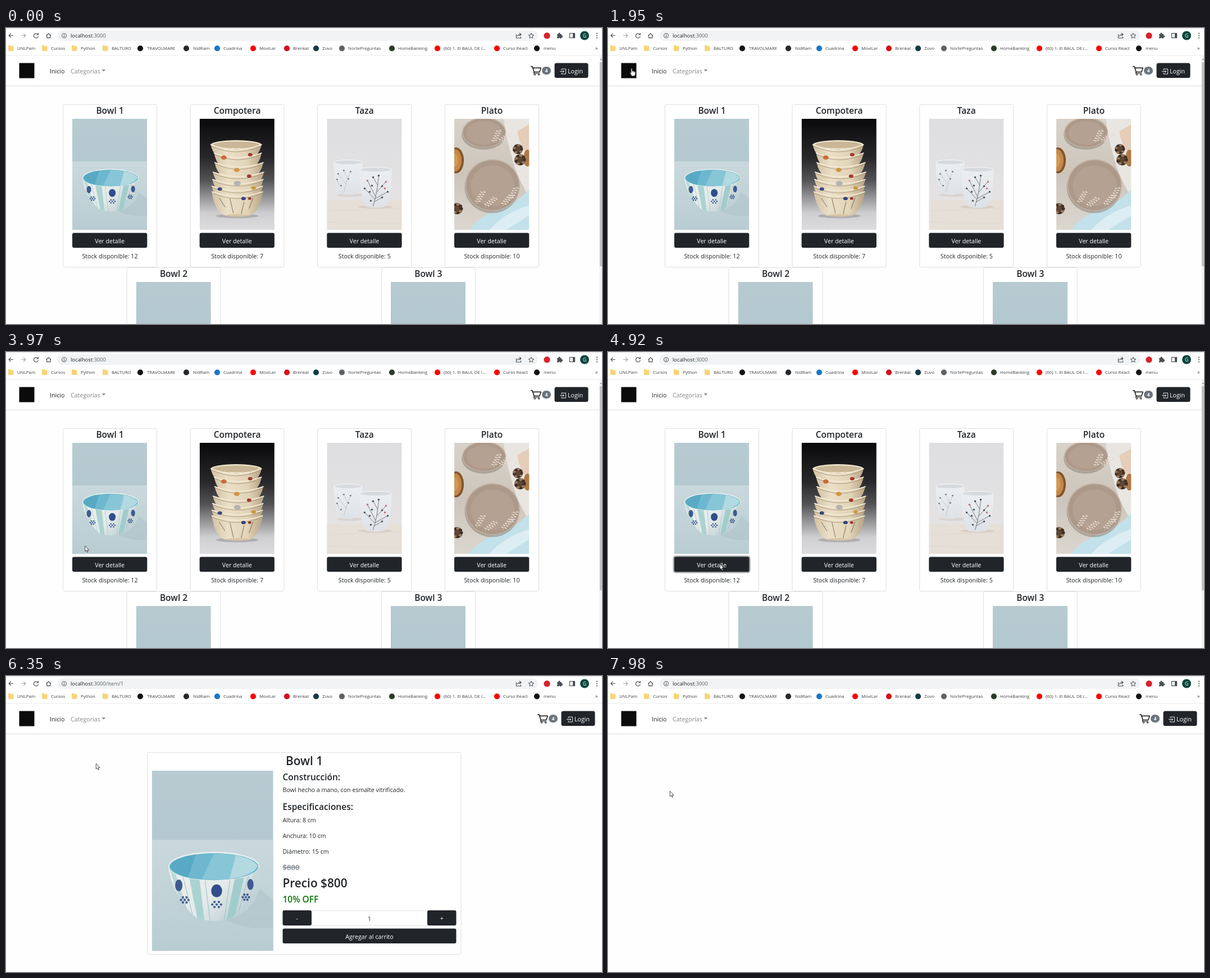
An HTML page for the animation above (8000 ms loop, 1061 by 528 pixels).

```html
<!DOCTYPE html>
<html lang="es">
<head>
<meta charset="utf-8">
<title>Tienda</title>
<style>
html, body { margin: 0; width: 100%; height: 100%; background: #fefefe; }
svg#stage { position: fixed; left: 0; top: 0; width: 1061px; height: 528px; font: 10.66px "Open Sans", "Noto Sans", sans-serif; fill: #212529; }
.mark { font-size: 7.9px; fill: #3c4043; }
.url { font-size: 9.3px; fill: #202124; }
.h5 { font-size: 15.5px; font-weight: 600; }
.h3 { font-size: 20.8px; font-weight: 600; }
.mid { text-anchor: middle; }
.white { fill: #fff; }
.line { fill: none; stroke: #4b4f54; stroke-width: 1.2; }
</style>
</head>
<body>
<svg id="stage" viewBox="0 0 1061 528" xmlns="http://www.w3.org/2000/svg"></svg>
<script>
const stage = document.getElementById('stage');
const DARK = '#212529';

const rect = (x, y, w, h, fill, more = '') => `<rect x="${x}" y="${y}" width="${w}" height="${h}" fill="${fill}" ${more}/>`;
const dot = (x, y, r, fill, more = '') => `<circle cx="${x}" cy="${y}" r="${r}" fill="${fill}" ${more}/>`;
const oval = (x, y, rx, ry, fill, more = '') => `<ellipse cx="${x}" cy="${y}" rx="${rx}" ry="${ry}" fill="${fill}" ${more}/>`;
const text = (x, y, s, cls = '', more = '') => `<text x="${x}" y="${y}" class="${cls}" ${more}>${s}</text>`;
const path = (d, fill, more = '') => `<path d="${d}" fill="${fill}" ${more}/>`;
const stroke = (d, color, w) => path(d, 'none', `stroke="${color}" stroke-width="${w}" stroke-linecap="round"`);
const range = (n, fn) => Array.from({ length: n }, (_, i) => fn(i)).join('');
const grad = (id, stops, dir = 'x2="0" y2="1"') => `<linearGradient id="${id}" ${dir}>` +
  stops.map(([o, c]) => `<stop offset="${o}" stop-color="${c}"/>`).join('') + '</linearGradient>';
const photo = (id, body) => `<symbol id="${id}" viewBox="0 0 133 198">${body}</symbol>`;
const frame = (x, y, w, h) => rect(x + .5, y + .5, w - 1, h - 1, '#fff', 'rx="2.5" stroke="#dfdfdf"');
const button = (x, y, w, h, label) => rect(x, y, w, h, DARK, 'rx="3"') + text(x + w / 2, y + h / 2 + 4.8, label, 'mid white');

function bowlPhoto() {
  const body = 'M18 105C19 118 28 139 37 149Q46 161 52 163Q68 167 84 163Q91 161 100 149C110 136 117 118 118 105Z';
  const flower = (x, y, w) => dot(x, y, 1.3, '#3f5a90') +
    range(6, i => dot(x + w * Math.cos(i * Math.PI / 3), y + 3.2 * Math.sin(i * Math.PI / 3), 1.3, '#3f5a90'));
  return rect(0, 0, 133, 198, 'url(#wall)') + rect(0, 76, 133, 122, 'url(#table)') +
    path('M80 164Q110 158 118 130L133 142V172Q105 176 80 164Z', '#abc1c7', 'opacity=".5"') +
    `<clipPath id="bowlClip"><path d="${body}"/></clipPath>` + path(body, 'url(#glaze)') +
    '<g clip-path="url(#bowlClip)">' +
    path('M41 118H52L58 168H51Z', '#a9d3d1') + path('M91 118H101L89 168H81Z', '#a0cdcb') +
    path('M18 104H23L42 162H37Z', '#bcdad9') + path('M113 105H120V130L104 150Z', '#c5d5d8') +
    stroke('M58 118L64 166M86 118L79 166M34 116L46 164M106 115L93 163', '#8fc0ca', .6) + '</g>' +
    oval(68, 105, 50, 16, '#e6eeed') + oval(68, 105.5, 48.8, 14.8, '#6db8cf') +
    path('M68 91Q80 90 92 93L85 119Q70 121 55 119Z', '#86c6d7') + path('M92 93Q112 97 116 105Q113 112 97 117L85 119Z', '#b3d9e1') +
    path('M20 105Q22 96 48 92L40 117Q23 114 20 105Z', '#58aac4') +
    oval(29.5, 126, 4, 6.5, '#3f5a90') + oval(71, 132, 6, 7, '#304d8d') + oval(108, 125, 3.5, 6, '#3f5a90') +
    flower(36, 142, 4) + flower(71, 147, 4.8) + flower(103, 139, 3.4);
}

function stackPhoto() {
  const rims = [[65, 46, 45], [68, 61, 42], [70, 78, 43], [69, 95, 45], [68, 108, 45], [67, 120, 45], [67, 130, 45]];
  const bowls = rims.map(([x, y, r], i) => {
    const h = i < 6 ? 28 : 42, sag = i ? 8 : 9;
    return path(`M${x - r} ${y}C${x - r + 2} ${y + h * .5} ${x - 32} ${y + h - 2} ${x - 22} ${y + h}Q${x} ${y + h + 3} ${x + 22} ${y + h}C${x + 32} ${y + h - 2} ${x + r - 2} ${y + h * .5} ${x + r} ${y}Q${x} ${y + sag * 2} ${x - r} ${y}Z`, 'url(#clay)') +
      stroke(`M${x - r} ${y}Q${x} ${y + sag * 2} ${x + r} ${y}`, '#f3ead6', 1.8) +
      stroke(`M${x - r + 2} ${y + 3}Q${x} ${y + sag * 2 + 5} ${x + r - 2} ${y + 3}`, '#9b8567', .7);
  }).join('');
  const spots = [[43, 69, 5, '#cf6a35'], [90, 64, 4, '#a5382c'], [66, 91, 5, '#cf9743'], [88, 102, 4, '#a5382c'], [67, 115, 6, '#b5b3b0'],
    [36, 125, 4, '#3a4681'], [96, 123, 4, '#c99a3a'], [78, 142, 4, '#34427f'], [89, 142, 3, '#98332d']];
  return rect(0, 0, 133, 198, 'url(#studio)') + oval(67, 173, 38, 4, '#8d8b8b', 'opacity=".5"') +
    oval(65, 46, 45, 8, '#efe4cc') + oval(65, 46.5, 42, 6, '#c9b696') + bowls +
    spots.map(([x, y, r, c]) => oval(x, y, r, r * .75, c)).join('') +
    stroke('M54 142L60 168M79 148L74 169M35 141L45 157M95 141L88 160', '#4c4037', .7) +
    oval(67, 172, 20, 2.2, '#d6c4a5');
}

function cupsPhoto() {
  const cup = (x, y, w, h) => path(`M${x} ${y}C${x} ${y + h * .6} ${x + 6} ${y + h} ${x + 15} ${y + h}Q${x + w / 2} ${y + h + 3} ${x + w - 15} ${y + h}C${x + w - 6} ${y + h} ${x + w} ${y + h * .6} ${x + w} ${y}Z`, 'url(#cup)') +
    oval(x + w / 2, y, w / 2, 4.5, '#eff1f3') + oval(x + w / 2, y + .5, w / 2 - 1.5, 3.4, '#d6d9de');
  const berries = (pts, color, r) => pts.map(([x, y, red]) => dot(x, y, r, red ? '#bf6a62' : color)).join('');
  return rect(0, 0, 133, 198, 'url(#pale)') + rect(0, 145, 133, 53, '#e6dfd7') + stroke('M0 164L133 159M0 184L133 187', '#ddd3c8', .6) +
    oval(42, 136, 25, 3, '#cfc8c3', 'opacity=".5"') + cup(12, 77, 51, 57) +
    stroke('M30 130Q34 112 42 94M34 116L20 98M37 108L30 92M22 118L18 108', '#a3a6ab', .5) +
    berries([[20, 98], [30, 92], [42, 94], [18, 108], [25, 119], [38, 107]], '#75787e', 1.4) +
    oval(86, 157, 30, 3, '#cfc4b9', 'opacity=".6"') + cup(58, 90, 57, 67) +
    stroke('M82 155Q90 130 92 102M85 143L67 124M86 138L72 110M89 130L105 112M86 142L108 130M90 118L82 104M84 148L98 140', '#4a4d52', .7) +
    berries([[67, 124, 0], [72, 110, 1], [82, 104, 0], [92, 101, 0], [105, 112, 1], [108, 130, 0], [98, 140, 0], [76, 130, 0], [98, 120, 0], [103, 124, 1], [78, 146, 0], [80, 119, 0]], '#484b50', 1.6);
}

function platesPhoto() {
  const sprig = (x, y, turn) => `<g transform="translate(${x} ${y}) rotate(${turn})">` + stroke('M0 0Q3 -14 9 -25', '#e6dcd1', .6) +
    range(5, i => oval(i * 1.6 - 2, -4 - i * 4.4, 2.1, 1, '#e6dcd1') + oval(i * 1.6 + 4, -5 - i * 4.4, 2.1, 1, '#e6dcd1')) + '</g>';
  const cone = (x, y, r) => dot(x, y, r, '#5d4635') + range(9, i => oval(x + r * .75 * Math.cos(i * .7), y + r * .75 * Math.sin(i * .7), r * .3, r * .2, i % 2 ? '#9b7b5c' : '#3c2d24'));
  const plate = (x, y, rx, ry) => oval(x - 1, y + 4, rx, ry, '#7d7166', 'opacity=".45"') + oval(x, y, rx, ry, '#c3b3a5') +
    oval(x, y + .5, rx - 1.5, ry - 1.5, '#ac9989') + oval(x, y + 1, rx * .8, ry * .78, '#b4a191');
  return rect(0, 0, 133, 198, 'url(#linen)') + path('M88 0H133V140L112 100Q92 40 88 0Z', '#e9e6e2') + path('M112 22L133 10V66Q116 50 112 22Z', '#e6cdb9') +
    path('M26 198Q44 172 84 160Q114 146 133 126V198Z', '#c2e1ea') + path('M62 198Q88 168 133 154V172L92 198Z', '#dceef3') +
    oval(3, 74, 14, 23, '#80552f') + oval(1, 74, 12, 20, '#c48746') + oval(0, 74, 7, 12, '#d39a58') +
    oval(130, 70, 7, 15, '#b07a45') + plate(53, 24, 39, 27) + plate(68, 118, 48.5, 46) +
    sprig(70, 43, 5) + sprig(80, 41, 35) + sprig(40, 151, 10) + sprig(55, 157, 30) + sprig(86, 155, 20) + sprig(100, 145, 5) +
    cone(113, 54, 9) + cone(117, 73, 10) + cone(5, 160, 10);
}

const defs = '<defs>' +
  grad('wall', [[0, '#b7cbd1'], [1, '#aec5cc']]) + grad('table', [[0, '#c9d8dc'], [.6, '#c0d2d7'], [1, '#b8ccd2']]) +
  grad('glaze', [[0, '#eef0ee'], [.6, '#e4eae9'], [1, '#bccdd1']], 'x2="1" y2=".6"') +
  grad('studio', [[0, '#09090b'], [.35, '#28282b'], [.55, '#525255'], [.7, '#929294'], [.85, '#cfcfd1'], [1, '#dcdcde']]) +
  grad('clay', [[0, '#d3c2a4'], [.3, '#eadfc7'], [.7, '#e2d4b8'], [1, '#b7a384']], 'x2="1" y2="0"') +
  grad('pale', [[0, '#dedee1'], [1, '#e7e4e3']]) + grad('cup', [[0, '#eceef1'], [1, '#dee2e7']]) +
  grad('linen', [[0, '#d8d2ca'], [.5, '#cdc5ba'], [1, '#dbd6cf']]) +
  photo('bowl', bowlPhoto()) + photo('stack', stackPhoto()) + photo('cups', cupsPhoto()) + photo('plates', platesPhoto()) + '</defs>';

function browser() {
  const marks = [['UNLPam', 20, 9], ['Cursos', 80, 69], ['Python', 133, 122], ['BALTURO', 188, 177],
    ['TRAVOLMARE', 251, 239, '#111'], ['NidRam', 333, 321, '#24292e'], ['Cuadrina', 387, 376, '#1778c8'], ['MoviLar', 451, 440, '#f00'],
    ['Brenkal', 511, 500, '#d3111b'], ['Zuvo', 563, 552, '#123c48'], ['NortePreguntas', 609, 598, '#5f6368'], ['HomeBanking', 698, 687, '#2d3a2c'],
    ['(60) 1. El BAUL DE I...', 779, 768, '#f00'], ['Curso React', 885, 874, '#f00'], ['menu', 957, 945, '#111']];
  const line = d => path(d, 'none', 'class="line"');
  return rect(0, 0, 1061, 49, '#fff') + rect(0, 0, 1061, 1, '#dee1e6') +
    line('M13 13.5H5.2M8.8 9.8L5.1 13.5L8.8 17.2') +
    `<g opacity=".5">${line('M27 13.5H34.8M31.2 9.8L34.9 13.5L31.2 17.2')}</g>` +
    line('M56.5 11.2A4 4 0 1 0 57.4 14.5M57.5 9V12H54.4') + line('M71.5 13.8L75.8 9.8L80 13.8M72.8 13V17.6H78.8V13') +
    rect(91, 4, 856, 19, '#f1f3f4', 'rx="9.5"') +
    dot(103.5, 13.7, 4, 'none', 'class="line" style="stroke-width:1"') + line('M103.5 13V16M103.5 11V12') +
    '<text x="115" y="17" class="url">localhost<tspan id="tail" fill="#5f6368">:3000</tspan></text>' +
    line('M909.5 12H908.5V18H916.5V15.5M910.5 15Q911 11.6 916.8 11.6M914 9L917 11.6L914 14.2') +
    path('M935 9L936.4 12.3L939.8 12.6L937.2 14.8L938 18.2L935 16.4L932 18.2L932.8 14.8L930.2 12.6L933.6 12.3Z', 'none', 'stroke="#4b4f54"') +
    dot(963, 13.7, 5.6, '#d8232a') +
    path('M981 11H983.3A1.8 1.8 0 1 1 986.7 11H989V13.4A1.7 1.7 0 1 1 989 16.6V18.5H986.5A1.7 1.7 0 0 0 983.5 18.5H981V16A1.7 1.7 0 0 0 981 13Z', '#4b4f54') +
    rect(1003.5, 9.5, 9, 8, 'none', 'class="line"') + rect(1009, 9, 4, 9, '#4b4f54') +
    dot(1030, 13.5, 8, '#0b473d') + text(1030, 16.6, 'G', 'mid white', 'font-size="8.5"') +
    [9.5, 13.5, 17.5].map(y => dot(1052, y, 1.1, '#4b4f54')).join('') +
    marks.map(([s, x, ix, c]) => (c ? dot(ix, 36.3, 5.1, c) : path(`M${ix - 5} 31h4l1 1.3h4.5v8.7h-9.5z`, '#f8d477')) + text(x, 39, s, 'mark')).join('') +
    text(1049, 39, '»', 'mark', 'style="font-size:9px"') + rect(0, 48.5, 1061, 1, '#e3e5e8');
}

const navbar = () => rect(0, 102, 1061, 3, '#000', 'opacity=".035"') + rect(0, 49.5, 1061, 53, '#fff') + rect(0, 102, 1061, 1, '#e9e9ea') +
  rect(23.5, 62.5, 27, 27, '#0b0b0b') + text(78, 80.6, 'Inicio') +
  '<g id="cat">' + text(115, 80.6, 'Categorías') + '<path d="M170.5 74H177.3L173.9 77.6Z"/></g>' +
  '<g id="right">' + path('M934 68.7H937L940.2 78.5H949.8L952.2 71.2H938.2', 'none', 'stroke="#111" stroke-width="1.5" stroke-linejoin="round"') +
  path('M940.2 78.5L939.5 81H950', 'none', 'stroke="#111" stroke-width="1.2"') +
  dot(941.5, 83, 1.3, '#fff', 'stroke="#111"') + dot(948.7, 83, 1.3, '#fff', 'stroke="#111"') +
  rect(954, 69, 16, 14, '#6c757d', 'rx="7"') + text(962, 79, '4', 'mid white', 'font-size="8.2" font-weight="700"') +
  rect(976.5, 62.5, 60, 26.5, DARK, 'rx="3.5"') +
  path('M989 75.5V73H996.5V82H989V79.5M986 77.5H993.5M991.5 75.5L993.6 77.5L991.5 79.5', 'none', 'stroke="#fff" stroke-width=".9"') +
  text(1000, 80.6, 'Login', 'white') + '</g>';

const detailButton = (x, y) => button(x, y, 133.3, 26.4, 'Ver detalle');

function card(x, y, title, stock, image) {
  return frame(x, y, 168, 291) + text(x + 84, y + 17, title, 'h5 mid') +
    `<use href="#${image}" x="${x + 17}" y="${y + 26}" width="133.3" height="198.3"/>` +
    detailButton(x + 17, y + 229.6) + text(x + 84, y + 274.5, 'Stock disponible: ' + stock, 'mid');
}

const home = () => '<g id="home">' +
  card(101, 136, 'Bowl 1', 12, 'bowl') + card(327.6, 136, 'Compotera', 7, 'stack') +
  card(554.3, 136, 'Taza', 5, 'cups') + card(781, 136, 'Plato', 10, 'plates') +
  card(214.5, 427, 'Bowl 2', 8, 'bowl') + card(667.8, 427, 'Bowl 3', 8, 'bowl') +
  '<g id="focus">' + rect(116.8, 364.4, 135.6, 28.8, 'none', 'rx="4" stroke="#a0a2a4" stroke-width="2.3"') + detailButton(118, 365.6) + '</g>' +
  rect(1056.5, 49.5, 5, 479, '#f1f1f1') + rect(1057, 61, 4, 364, '#c1c1c1') + path('M1057.5 57L1059.2 54.5L1061 57Z', '#8a8a8a') + '</g>';

const detail = () => '<g id="detail">' + frame(251, 136, 559.5, 361) + text(531, 158.5, 'Bowl 1', 'h3 mid') +
  '<use href="#bowl" x="259.7" y="168.8" width="216" height="321.6"/>' +
  text(492.5, 185.7, 'Construcción:', 'h5') + text(492.5, 207.3, 'Bowl hecho a mano, con esmalte vitrificado.') +
  text(492.5, 239.3, 'Especificaciones:', 'h5') +
  ['Altura: 8 cm', 'Anchura: 10 cm', 'Diámetro: 15 cm'].map((s, i) => text(492.5, 261.3 + i * 28, s)).join('') +
  text(492.5, 346, '$880', '', 'style="font-size:13.2px;font-weight:600;fill:#7d858c;text-decoration:line-through"') +
  text(492.5, 376.7, 'Precio $800', 'h3') + text(492.5, 403.5, '10% OFF', 'h5', 'style="fill:#0b770b"') +
  rect(493, 418.5, 308, 26.4, '#fff', 'rx="3" stroke="#dee2e6"') +
  button(492.5, 418, 51.5, 27, '-') + button(750, 418, 51.5, 27, '+') + text(647, 436.5, '1', 'mid') +
  button(492.5, 450.6, 309, 26.4, 'Agregar al carrito') + '</g>';

const pointer = () => '<circle id="click" r="8.3" fill="#fff200" opacity=".85" style="mix-blend-mode:multiply"/>' +
  '<g id="arrow">' + path('M.3 .3V10L2.5 8L4.1 11.6L5.6 10.9L4.1 7.5H7Z', '#fff', 'stroke="#222" stroke-width=".8"') + '</g>' +
  '<g id="hand">' + path('M-1 1Q-1 0 0 0Q1 0 1 1V4.6Q2.4 4 3 5Q4.4 4.6 5 5.7Q6.8 5.4 6.8 7V9.6Q6.8 11 5.8 12.2V13.8H-.2V12.4L-2.8 8.8Q-3.4 7.4 -2.2 7.3L-1 8.4Z', '#fff', 'stroke="#222" stroke-width=".8"') +
  stroke('M1 4.8V7M3 5.2V7.2M5 5.8V7.4', '#222', .5) + '</g>';

stage.innerHTML = defs + browser() + navbar() + home() + detail() + pointer();

// Moves: start time, step count, way points [progress, x, y]
const STEP = 70;
const moves = [
  [900, 12, [[0, 1015, 516], [6 / 11, 403, 284], [.85, 140, 172], [1, 77, 145]]],
  [1740, 4, [[0, 68, 124], [.5, 50, 84], [1, 42, 72]]],
  [3080, 12, [[0, 42, 78], [.18, 82, 84], [.36, 122, 84], [.5, 138, 118], [.82, 129, 280], [1, 119, 331]]],
  [3900, 8, [[0, 125, 338], [.6, 190, 370], [.8, 203, 378], [1, 199, 378]]],
  [5730, 7, [[0, 197, 366], [.5, 178, 250], [.85, 164, 172], [1, 162, 161]]],
  [6350, 11, [[0, 160, 156], [.4, 141, 100], [.6, 121, 84], [.85, 90, 78], [1, 84, 76]]],
  [7840, 3, [[0, 89, 100], [.5, 102, 165], [1, 110, 205]]]
];
const clicks = [[2420, 42, 73], [4850, 199, 378], [7500, 84, 77]];

function place(t) {
  const leg = moves.filter(m => t >= m[0]).pop();
  if (!leg) return [-50, -50];
  const [start, steps, pts] = leg;
  const u = Math.min(1, Math.floor((t - start) / STEP) / (steps - 1));
  const i = Math.max(1, pts.findIndex(p => u <= p[0] + 1e-9));
  const [a, b] = [pts[i - 1], pts[i]];
  const k = (u - a[0]) / (b[0] - a[0]);
  return [a[1] + (b[1] - a[1]) * k, a[2] + (b[2] - a[2]) * k];
}

const el = id => document.getElementById(id);
const show = (id, on) => el(id).setAttribute('display', on ? 'inline' : 'none');
const shift = (id, x, y) => el(id).setAttribute('transform', `translate(${x} ${y})`);

function draw(t) {
  const onHome = t < 4990, onItem = !onHome && t < 7570;
  const [x, y] = place(t);
  const inside = (l, top, r, b) => x >= l && x <= r && y >= top && y <= b;
  const overCat = inside(110, 63, 180, 91);
  const overLink = overCat || inside(13, 63, 109, 91) || (t < 4920 && inside(118, 366, 251, 392));
  show('home', onHome);
  show('detail', onItem);
  show('focus', onHome && t >= 4920);
  shift('right', onHome ? 0 : 12, 0);
  el('tail').textContent = onItem ? ':3000/item/1' : ':3000';
  el('cat').setAttribute('fill', overCat ? '#4d4f51' : '#858789');
  const click = clicks.find(c => t >= c[0] && t < c[0] + STEP);
  show('click', !!click);
  if (click) shift('click', click[1], click[2]);
  show('arrow', !overLink);
  show('hand', overLink);
  shift('arrow', x, y);
  shift('hand', x, y);
}

const begin = performance.now();
function tick() {
  draw((performance.now() - begin) % 8000);
  requestAnimationFrame(tick);
}
tick();
</script>
</body>
</html>
```
